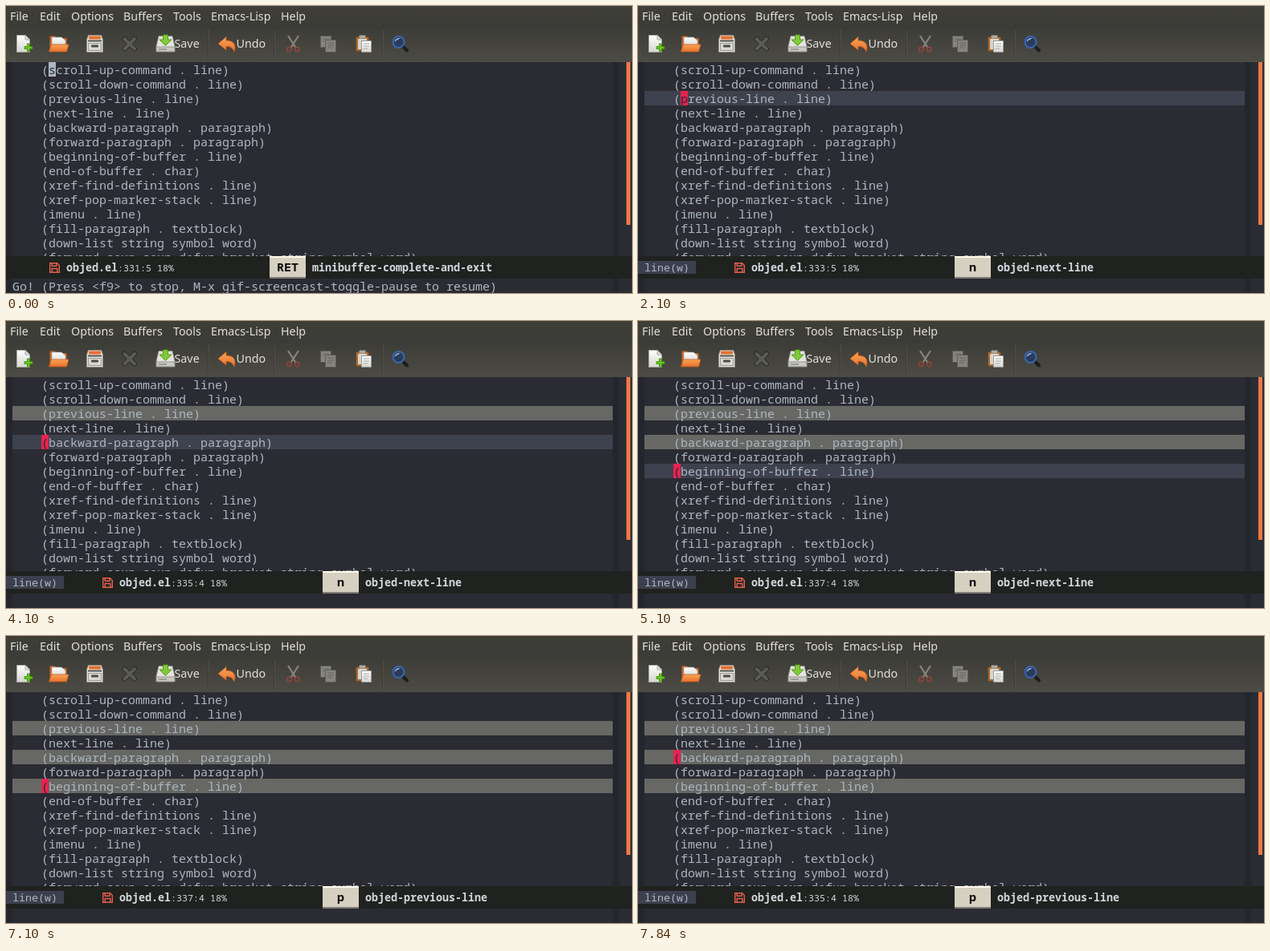
These frames come from a looping animation (779 px wide and 358 px high, 8000 ms). An HTML page:

```html
<!DOCTYPE html>
<html lang="en">
<head>
<meta charset="utf-8">
<title>Editor line marking</title>
<style>
html, body { margin: 0; width: 100%; height: 100%; overflow: hidden; background: #2b2b33; }
svg { display: block; }
text { white-space: pre; font-family: "Noto Sans Mono", "DejaVu Sans Mono", monospace; font-size: 15px; fill: #adb6c2; }
.ui text { font-family: "Noto Sans", "Open Sans", sans-serif; font-size: 14.3px; fill: #e4e0d8; }
.mode text { font-size: 13.33px; fill: #d3d8de; }
.mode .pos { font-size: 11.67px; }
.mode .bold { font-weight: 700; }
.mode .key { font-size: 15px; font-weight: 700; fill: #0b0b0b; text-anchor: middle; }
</style>
</head>
<body>
<svg width="779" height="358" viewBox="0 0 779 358">
  <defs>
    <linearGradient id="menuBg" x2="0" y2="1"><stop stop-color="#3f3e39"/><stop offset="1" stop-color="#3b3c37"/></linearGradient>
    <linearGradient id="barBg" x2="0" y2="1"><stop stop-color="#3d3d38"/><stop offset="1" stop-color="#4c4b44"/></linearGradient>
    <linearGradient id="paper" x2="0" y2="1"><stop stop-color="#fff"/><stop offset="1" stop-color="#d5d5d0"/></linearGradient>
    <linearGradient id="orange" x2="0" y2="1"><stop stop-color="#f9a558"/><stop offset="1" stop-color="#e8702a"/></linearGradient>
    <clipPath id="view"><rect y="70" width="779" height="242"/></clipPath>
  </defs>

  <rect width="779" height="358" fill="#2b2b33"/>
  <path d="M0 70H8V358H0ZM755 70H763V358H755Z" fill="#23272d"/>
  <rect x="763" y="70" width="16" height="242" fill="#2a2c33"/>
  <rect x="772" y="70" width="5" height="203" fill="#f07746"/>

  <g clip-path="url(#view)">
    <g id="bands"></g>
    <g id="lines"></g>
    <rect id="cursor" width="9" height="18"/>
    <text id="under" style="fill:#2b2b33"></text>
  </g>

  <g class="ui">
    <rect width="779" height="27" fill="url(#menuBg)"/>
    <rect y="27" width="779" height="43" fill="url(#barBg)"/>
    <g id="menu"></g>
    <path d="M251.5 30V66M333.5 30V66M468.5 30V66" stroke="#3c3c36"/>
    <path d="M252.5 30V66M334.5 30V66M469.5 30V66" stroke="#504f47"/>
    <text x="209.5" y="52">Save</text>
    <text x="286.5" y="52">Undo</text>

    <!-- new file -->
    <path d="M13.5 36.5H24L29.5 42V57.5H13.5Z" fill="url(#paper)" stroke="#a6a69f"/>
    <path d="M24 36.5V42H29.5" fill="#ddd" stroke="#aaa"/>
    <path d="M26.500 47h3v3.500h3.500v3h-3.500v3.500h-3v-3.500h-3.500v-3h3.500Z" fill="#63c21c" stroke="#3e8a0c" stroke-width=".8"/>

    <!-- open -->
    <path d="M54.500 56V37.500H61L63 40H75.500V56Z" fill="#cf6325"/>
    <path d="M57 39H69L74 43V51H57Z" fill="url(#paper)" stroke="#aaa" stroke-width=".7"/>
    <path d="M53.500 57L56.500 48H78L75.500 57Z" fill="url(#orange)" stroke="#c45a20" stroke-width=".8"/>

    <!-- drawer -->
    <path d="M102.500 36.500H118.500L120.500 42V57.500H100.500V42Z" fill="#e6e5df" stroke="#8f8f88"/>
    <rect x="103" y="37.500" width="15" height="4" rx="1" fill="#e46f32"/>
    <path d="M102 43.500H119" stroke="#55554f" stroke-width="2"/>
    <rect x="102.500" y="46.500" width="16" height="9" fill="#d9d8d1" stroke="#88887f" stroke-width=".8"/>
    <rect x="106" y="48.500" width="9" height="3" rx="1" fill="#4b4b46"/>

    <!-- close -->
    <path d="M147.500 41L160 53.500M160 41L147.500 53.500" stroke="#2b2b28" stroke-width="6" stroke-linecap="round"/>
    <path d="M147.500 41L160 53.500M160 41L147.500 53.500" stroke="#5b5b55" stroke-width="4" stroke-linecap="round"/>

    <!-- save -->
    <path d="M190 37.500H207L210 50V57H187V50Z" fill="#e3e2dc" stroke="#8b8b84" stroke-width=".8"/>
    <path d="M187 51H210V57H187Z" fill="#c9c8c1" stroke="#85857e" stroke-width=".8"/>
    <path d="M190 54H200" stroke="#71716b"/>
    <path d="M195.500 36H201.500V42H206L198.500 49.500L191 42H195.500Z" fill="#83c93a" stroke="#4a9414" stroke-width=".9"/>

    <!-- undo -->
    <path d="M264 47L274 38.500V43C283 43 287 48 284 57C282 52 279 50.500 274 50.500V55Z" fill="url(#orange)" stroke="#c95b1e" stroke-width=".8"/>

    <!-- cut -->
    <path d="M351 37L360.500 52M364 37L354.500 52" stroke="#85857d" stroke-width="2.200"/>
    <circle cx="352.500" cy="54" r="2.700" fill="none" stroke="#85443a" stroke-width="2"/>
    <circle cx="362.500" cy="54" r="2.700" fill="none" stroke="#85443a" stroke-width="2"/>

    <!-- copy -->
    <g fill="#85857d" stroke="#5d5d56"><path d="M391.500 37.500H404.500V51.500H391.500Z"/><path d="M397.500 42.500H410.500V57.500H397.500Z"/></g>
    <path d="M394 41H402M394 44H396M400 46H408M400 49H408M400 52H406" stroke="#63635c"/>

    <!-- paste -->
    <rect x="435.500" y="38.500" width="16" height="18" rx="1.500" fill="#a66a36" stroke="#74481f"/>
    <rect x="438" y="41" width="11" height="13" fill="#d6d6cf"/>
    <rect x="439.500" y="36.500" width="8" height="4" rx="1" fill="#a8a8a1"/>
    <path d="M442.500 43.500H454.500V57.500H442.500Z" fill="url(#paper)" stroke="#999"/>
    <path d="M445 47H452M445 50H452M445 53H450" stroke="#aaa"/>

    <!-- search -->
    <path d="M493.500 50L499 55.500" stroke="#1d1d1d" stroke-width="4" stroke-linecap="round"/>
    <circle cx="488.500" cy="45" r="7" fill="#2b3b5a" stroke="#3a66ad" stroke-width="2"/>
    <path d="M483.500 45A5 5 0 0 1 490.500 40.500Q486 42 483.500 45Z" fill="#9db6da"/>
  </g>

  <g class="mode">
    <rect y="312" width="779" height="28" fill="#20221f"/>
    <g id="tag">
      <rect y="318" width="72" height="16" fill="#3c404e"/>
      <text x="8" y="331" style="fill:#adb6c2">line(w)</text>
    </g>
    <g id="status">
      <path d="M54.700 320.700H63.500L66.300 323.500V332.300H54.700Z" fill="none" stroke="#e5604f" stroke-width="1.400"/>
      <path d="M57.200 320.700V324.300H63V320.700M57.200 332V327.500H63.800V332" fill="none" stroke="#e5604f" stroke-width="1.400"/>
      <text class="bold" x="75" y="331">objed.el</text>
      <text class="pos" id="pos" x="139" y="331"></text>
      <rect x="328" y="312" width="45" height="28" fill="#d6d0c1"/>
      <path d="M328 313H373" stroke="#fffae8" stroke-width="2"/>
      <path d="M328 339H373" stroke="#807c73" stroke-width="2"/>
      <text class="key" id="key" x="350.500" y="331"></text>
      <text class="bold" id="command" x="381" y="331"></text>
    </g>
  </g>

  <text x="8" y="355" id="echo"><tspan style="fill:#62a5e0"></tspan><tspan></tspan></text>
</svg>

<script>
const LOOP = 8000, FIRST = 331, ROW = 18, TOP = 70;
const $ = id => document.getElementById(id);

function add(parent, tag, attrs, content = "") {
  const el = document.createElementNS("http://www.w3.org/2000/svg", tag);
  for (const k in attrs) el.setAttribute(k, attrs[k]);
  el.textContent = content;
  return parent.appendChild(el);
}

const lines = [
  "scroll-up-command . line", "scroll-down-command . line", "previous-line . line",
  "next-line . line", "backward-paragraph . paragraph", "forward-paragraph . paragraph",
  "beginning-of-buffer . line", "end-of-buffer . char", "xref-find-definitions . line",
  "xref-pop-marker-stack . line", "imenu . line", "fill-paragraph . textblock",
  "down-list string symbol word", "forward-sexp sexp defun bracket string symbol word"
].map(s => `(${s})`);

const bands = lines.map((s, i) => {
  add($("lines"), "text", { x: 44, y: TOP + 15 + i * ROW }, s);
  return add($("bands"), "rect", { x: 8, y: TOP + i * ROW, width: 747, height: ROW });
});

[["File", 5], ["Edit", 42], ["Options", 81], ["Buffers", 146], ["Tools", 208], ["Emacs-Lisp", 255], ["Help", 342]]
  .forEach(([s, x]) => add($("menu"), "text", { x, y: 18 }, s));

const step = (at, line, col, key, command, marks = [], echo = ["", ""]) =>
  ({ at, line, col, key, command, marks, echo });
const NEXT = "objed-next-line", PREV = "objed-previous-line", MARK = "objed-mark";
const steps = [
  step(0, 331, 5, "RET", "minibuffer-complete-and-exit", [],
    ["", "Go! (Press <f9> to stop, M-x gif-screencast-toggle-pause to resume)"]),
  step(100, 332, 5, "C-n", "next-line", [], ["scroll-down-command", ": (&optional ARG)"]),
  step(2100, 333, 5, "n", NEXT),
  step(3100, 334, 4, "m", MARK, [333]),
  step(4100, 335, 4, "n", NEXT, [333]),
  step(5100, 337, 4, "n", NEXT, [333, 335]),
  step(6100, 338, 4, "m", MARK, [333, 335, 337]),
  step(7100, 337, 4, "p", PREV, [333, 335, 337]),
  step(7450, 336, 4, "p", PREV, [333, 335, 337]),
  step(7840, 335, 4, "p", PREV, [333, 335, 337])
];

let shown;
function render(t) {
  const s = steps.filter(p => p.at <= t).pop();
  if (s === shown) return;
  shown = s;
  const active = s !== steps[0], row = s.line - FIRST;
  const x = 44 + (s.col - 4) * 9, y = TOP + row * ROW;

  bands.forEach((band, i) => band.setAttribute("fill",
    s.marks.includes(FIRST + i) ? "#676864" : active && i === row ? "#3e414e" : "none"));

  $("cursor").setAttribute("x", x);
  $("cursor").setAttribute("y", y);
  $("cursor").setAttribute("fill", active ? "#e8224f" : "#adb6c2");
  $("under").setAttribute("x", x);
  $("under").setAttribute("y", y + 15);
  $("under").textContent = lines[row][s.col - 4];

  $("tag").setAttribute("visibility", active ? "visible" : "hidden");
  $("status").setAttribute("transform", `translate(${active ? 66 : 0})`);
  $("pos").textContent = `:${s.line}:${s.col} 18%`;
  $("key").textContent = s.key;
  $("command").textContent = s.command;
  s.echo.forEach((part, i) => $("echo").children[i].textContent = part);
}

const start = performance.now();
function tick() {
  render((performance.now() - start) % LOOP);
  requestAnimationFrame(tick);
}
tick();
</script>
</body>
</html>
```
